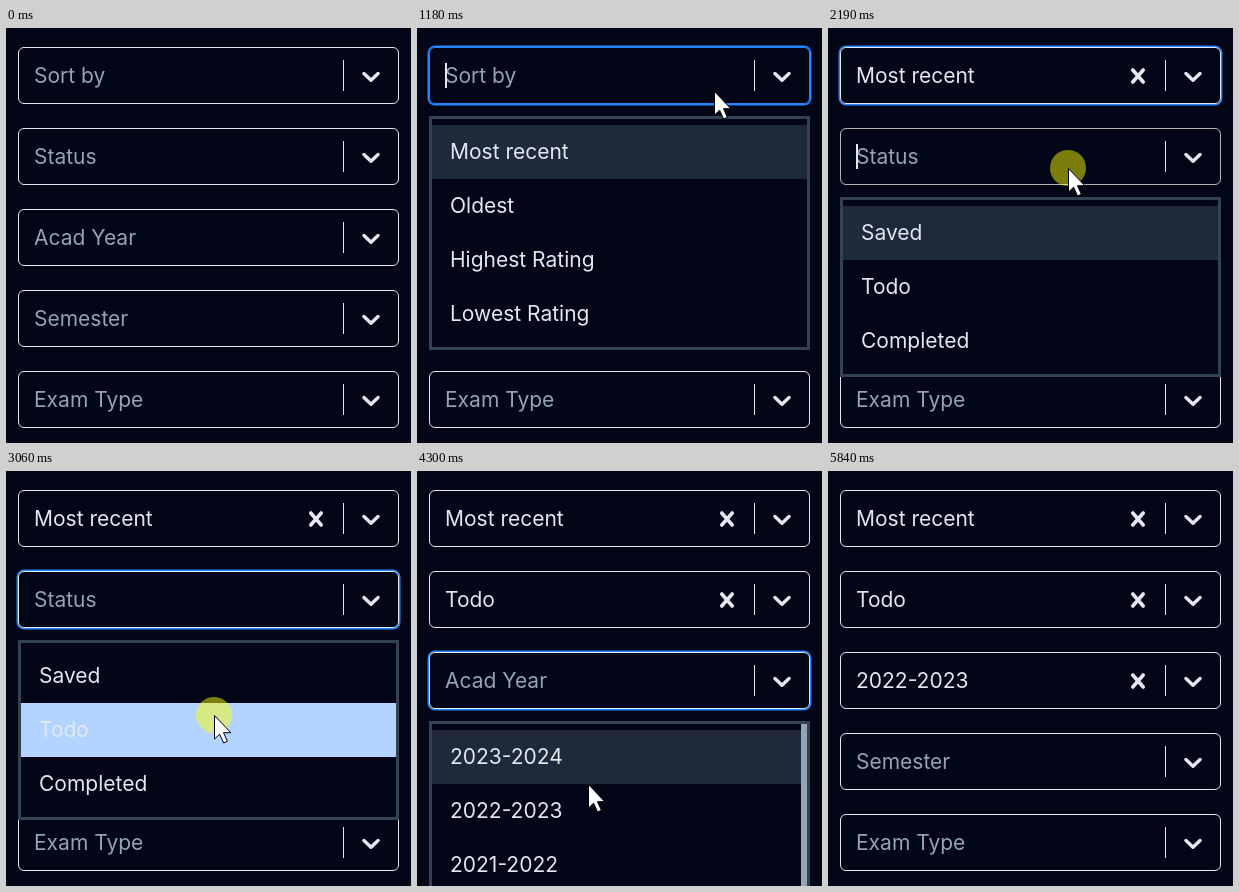
Write an HTML page that moves like this. It is 405 by 415 pixels and loops after 5.94 s.

```html
<!DOCTYPE html>
<html lang="en">
<head>
<meta charset="utf-8">
<title>Filter selects</title>
<style>
html, body { margin: 0; width: 100%; height: 100%; overflow: hidden; background: #020617; }
body { position: relative; font: 21px/30px Inter, "Open Sans", sans-serif; color: #e2e8f0; }
div, svg { position: absolute; box-sizing: border-box; white-space: nowrap; }
.field { left: 12px; width: 381px; height: 57px; border: 1px solid #e2e8f0; border-radius: 6px; }
.label { left: 15px; top: 12.5px; }
.caret { left: 15px; top: 15px; width: 2px; height: 25px; background: #e2e8f0; }
.bar { left: 324px; top: 12px; width: 1px; height: 31px; background: #e2e8f0; }
.icon { top: 12.5px; width: 30px; height: 30px; fill: none; stroke: #e2e8f0; stroke-linecap: round; stroke-linejoin: round; }
.menu { left: 12px; width: 381px; padding: 6px 0; border: 3px solid #334155; background: #020617; overflow: hidden; }
.option { position: relative; height: 54px; padding: 12px 18px; }
.thumb { right: 0; top: 0; width: 6px; height: 100%; background: #94a3b8; }
.click { width: 36px; height: 36px; margin: -18px; border-radius: 50%; background: rgba(255, 255, 0, .48); }
.cursor { width: 20px; height: 31px; left: 0; top: 0; overflow: visible; }
</style>
</head>
<body>
<script>
const LOOP = 5940, PITCH = 81, ROW = 54;
const LIGHT = [226, 232, 240], GREY = [179, 179, 179], BLUE = [38, 132, 255];

// open / press / pick: menu shown, option pressed, value set; blur: ring fades
const fields = [
  { name: 'Sort by', options: ['Most recent', 'Oldest', 'Highest Rating', 'Lowest Rating'],
    choice: 0, open: 1020, press: 1620, pick: 1700, blur: 2190, fade: 100 },
  { name: 'Status', options: ['Saved', 'Todo', 'Completed'],
    choice: 1, open: 2190, press: 3060, pick: 3130, blur: 3490, fade: 100 },
  { name: 'Acad Year', options: ['2023-2024', '2022-2023', '2021-2022', '2020-2021', '2019-2020'],
    choice: 1, open: 3490, press: 4430, pick: 4500, blur: 5780, fade: 60, scroll: true },
  { name: 'Semester' },
  { name: 'Exam Type' }
];

// start, end, from x, y, to x, y
const moves = [
  [360, 950, 328, 378, 297, 63],
  [1350, 1590, 297, 63, 246, 120],
  [1730, 1920, 246, 120, 240, 140],
  [2630, 2920, 240, 140, 208, 244],
  [3360, 3480, 208, 244, 173, 224],
  [3970, 4130, 173, 224, 171, 291],
  [4300, 4400, 171, 313, 174, 318],
  [4910, 5430, 190, 325, 226, 422]
];
const clicks = [[1020, 1160], [1620, 1740], [2190, 2330], [3060, 3130], [3490, 3640], [4430, 4570]];

const clamp = v => Math.max(0, Math.min(1, v));
const mix = (a, b, k) => `rgb(${a.map((v, i) => Math.round(v + (b[i] - v) * k))})`;
const show = (el, on) => { el.style.visibility = on ? 'visible' : 'hidden'; };

function add(parent, cls, text = '') {
  const el = document.createElement('div');
  el.className = cls;
  el.textContent = text;
  parent.append(el);
  return el;
}

function svg(parent, cls, box, d, attrs) {
  parent.insertAdjacentHTML('beforeend', `<svg class="${cls}" viewBox="${box}"><path d="${d}" ${attrs}/></svg>`);
  return parent.lastElementChild;
}

fields.forEach((f, i) => {
  f.top = 19 + i * PITCH;
  f.el = add(document.body, 'field');
  f.el.style.top = f.top + 'px';
  f.label = add(f.el, 'label');
  f.caret = add(f.el, 'caret');
  add(f.el, 'bar');
  f.cross = svg(f.el, 'icon', '0 0 20 20', 'M6.5 6L13.5 14M13.5 6L6.5 14', 'stroke-width="2.4"');
  f.cross.style.left = '282px';
  svg(f.el, 'icon', '0 0 20 20', 'M5.3 8.35L10 12.85L14.7 8.35', 'stroke-width="2.3"').style.left = '337px';
});

fields.filter(f => f.options).forEach(f => {
  f.menu = add(document.body, 'menu');
  f.menu.style.top = f.top + 69 + 'px';
  f.rows = f.options.map(o => add(f.menu, 'option', o));
  if (f.scroll) add(f.menu, 'thumb');
});

const click = add(document.body, 'click');
const cursor = svg(document.body, 'cursor', '0 0 20 31',
  'M.5 .5V24L5.6 19.2L9.6 28L13.4 26.3L9.5 17.7H16.8Z', 'fill="#fff" stroke="#000" stroke-width="1"');

function pointer(t) {
  const m = moves.filter(m => t >= m[0]).pop();
  if (!m || t >= 5430) return null;
  const [start, end, x0, y0, x1, y1] = m;
  const p = clamp((t - start) / (end - start));
  const k = start === 360 ? 1 - (1 - p) ** 2 : start === 4910 ? p ** 1.3 : p * p * (3 - 2 * p);
  return { x: x0 + (x1 - x0) * k, y: y0 + (y1 - y0) * k };
}

function drawField(f, t, at, covered) {
  const isOpen = t >= f.open && t < f.pick;
  const chosen = t >= f.pick;
  const hover = at && !covered && at.y >= f.top && at.y <= f.top + 57;
  const ring = f.open ? clamp((t - f.open) / 100) * (1 - clamp((t - f.blur) / f.fade)) : 0;
  f.el.style.borderColor = hover ? mix(GREY, BLUE, ring) : mix(LIGHT, LIGHT, 0);
  f.el.style.boxShadow = ring ? `0 0 0 ${1.5 * ring}px rgb(${BLUE})` : 'none';
  f.label.textContent = chosen ? f.options[f.choice] : f.name;
  f.label.style.color = chosen ? '#e2e8f0' : '#94a3b8';
  show(f.cross, chosen);
  show(f.caret, isOpen && (t - f.open) % 1000 < 485);
  if (!f.menu) return;

  show(f.menu, isOpen);
  const first = f.top + 78;
  const row = at && at.y > first ? Math.floor((at.y - first - .5) / ROW) : 0;
  f.rows.forEach((r, i) => {
    r.style.background = i !== row ? 'none' : t >= f.press ? '#b2d4ff' : '#1e293b';
  });
}

function draw(t) {
  const at = pointer(t);
  const covered = at && fields.some(f => t >= f.open && t < f.pick && at.y > f.top + 69);
  fields.forEach(f => drawField(f, t, at, covered));
  show(cursor, at);
  show(click, at && clicks.some(([a, b]) => t >= a && t < b));
  if (at) {
    const shift = `translate(${at.x}px, ${at.y}px)`;
    cursor.style.transform = click.style.transform = shift;
  }
}

const start = performance.now();
function tick() {
  draw((performance.now() - start) % LOOP);
  requestAnimationFrame(tick);
}
tick();
</script>
</body>
</html>
```
